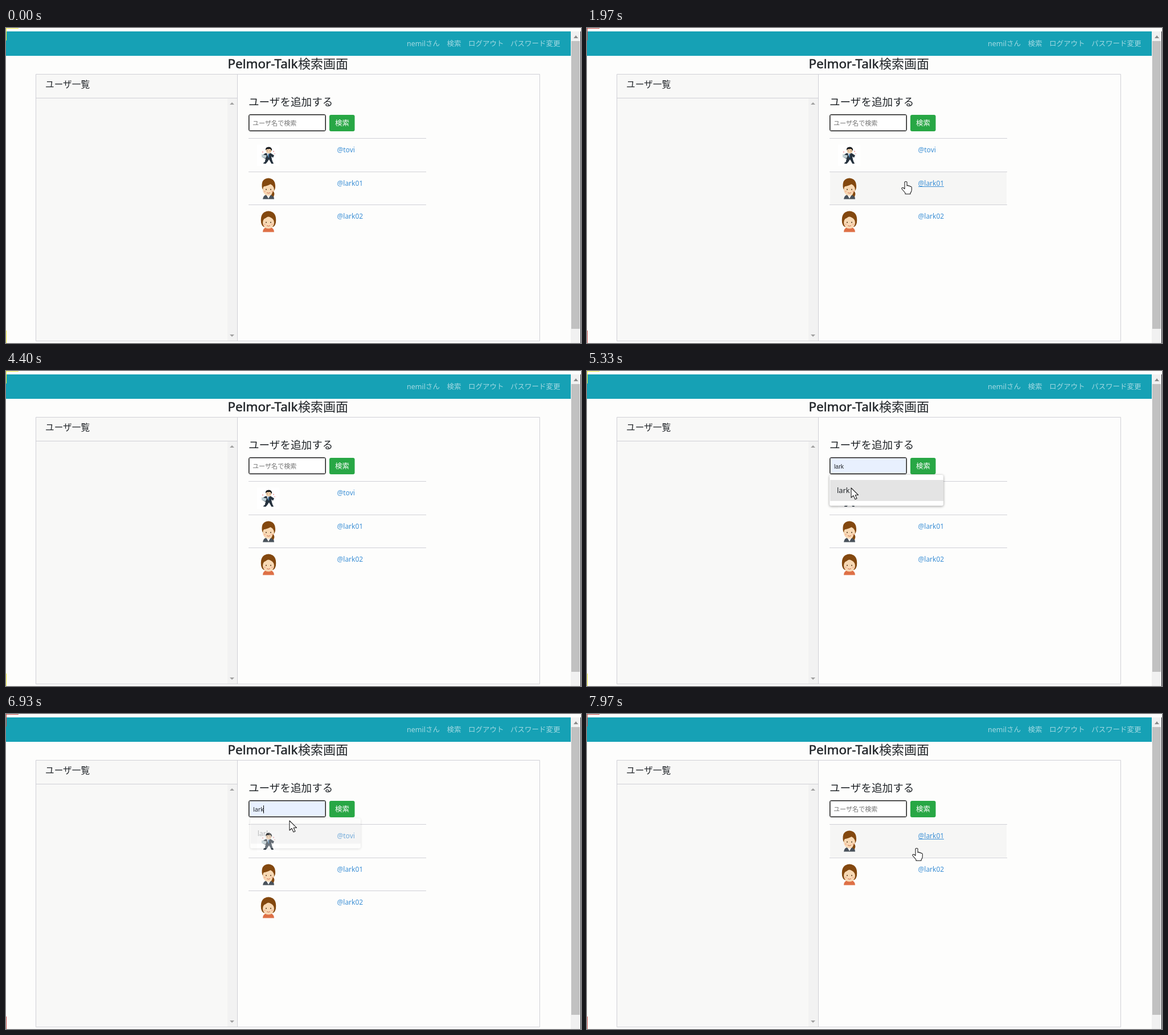
Animation of 1010x555 px, one loop 8 s. Source, as an HTML page:

```html
<!DOCTYPE html>
<html lang="ja">
<head>
<meta charset="utf-8">
<title>ユーザ検索</title>
<style>
html, body { margin: 0; width: 100%; height: 100%; overflow: hidden; background: #fdfdfc; }
svg { display: block; width: 1010px; height: 555px; }
text { font-family: "Noto Sans", "Noto Sans CJK JP", sans-serif; fill: #212529; }
.jp { font-family: "Noto Sans CJK JP", sans-serif; }
.thin { font-weight: 300; }
.title { font-size: 22.4px; stroke: #212529; stroke-width: .5px; }
.nav text { font-size: 12.5px; fill: #a2d9e2; }
.line { stroke: #d0d0d6; fill: none; }
.row .link { font-size: 12px; fill: #3d90d6; }
.row .under { stroke: #3d90d6; visibility: hidden; }
.row .bg { fill: #f6f6f5; visibility: hidden; }
.row.hover .bg, .row.hover .under { visibility: visible; }
</style>
</head>
<body>
<svg viewBox="0 0 1010 555">
  <defs>
    <g id="face">
      <ellipse cx="19" cy="20.500" rx="10" ry="10.500" fill="#f8d9b4"/>
      <g fill="#4a2c17"><circle cx="15" cy="20" r="1"/><circle cx="23" cy="20" r="1"/></g>
      <path d="M16 25.500Q19 28 22 25.500" fill="none" stroke="#c0503a" stroke-width=".8"/>
      <g fill="#f3b79a"><circle cx="12.500" cy="23.500" r="1.500"/><circle cx="25.500" cy="23.500" r="1.500"/></g>
    </g>
    <g id="man">
      <path fill="#fff" d="M-1 0H38V38H-1Z"/>
      <path fill="#26323e" d="M14 15L23 15L25 26L27 32L24 33L20 26L16 32L12 33L14 25L8 22L9 18Z"/>
      <path fill="#26323e" d="M23 15L29 19L27 23L23 20ZM11 31h4v2.500h-5ZM24 31h3l1 2.500h-4Z"/>
      <path fill="#fff" d="M16 15h5l-3 6Z"/>
      <path fill="#3f77a8" d="M18 16h1.500l.5 6-1.500 1Z"/>
      <path fill="#bfd0d5" d="M7 17L16 19L14 24L7 22Z"/>
      <ellipse cx="19.500" cy="10.500" rx="5" ry="4.800" fill="#f3cfa8"/>
      <path fill="#171a1d" d="M14 10Q13 4 20 4Q26 5 25 11L22 7.500L16 8Z"/>
      <path d="M16.500 11h1m4 0h1" stroke="#222"/>
      <g fill="#ec8f96"><circle cx="9" cy="13" r="1"/><circle cx="28" cy="12" r="1"/><circle cx="30" cy="16" r=".8"/></g>
    </g>
    <g id="ponytail">
      <path fill="#83480f" d="M8 18Q5 1 19 0Q32 1 31 17Q30 22 27 24Q30 28 27 32L22 29L10 22Z"/>
      <path fill="#49525b" d="M9 37Q10 30 16 29H23Q29 30 29 37Z"/>
      <path fill="#fff" d="M15 29H23L19 36Z"/>
      <use href="#face"/>
      <path fill="#83480f" d="M8 18Q8 4 19 3Q30 4 30 18Q27 14 25 9Q18 14 9 15Z"/>
      <path fill="#83480f" d="M27 23Q31 26 28 33L24 30Z"/>
    </g>
    <g id="bob">
      <path fill="#83480f" d="M6 20Q4 1 19 0Q34 1 32 20Q31 26 27 28H11Q7 26 6 20Z"/>
      <path fill="#de7046" d="M9 37Q9 30 16 28.500H22Q29 30 29 37Z"/>
      <path fill="#f8d9b4" d="M15 28H23Q19 33 15 28Z"/>
      <use href="#face"/>
      <path fill="#83480f" d="M8 20Q7 4 19 3Q31 4 30 20Q28 14 24 12Q21 11 19 8Q15 13 10 14Z"/>
    </g>
  </defs>

  <path fill="#fdfdfc" d="M0 0H1010V555H0Z"/>
  <path fill="#16a1b5" d="M0 6H992V49H0Z"/>
  <g class="nav">
    <text x="737" y="32" text-anchor="end">nemil</text>
    <text class="jp" x="737" y="32">さん</text>
    <text class="jp" x="774.500" y="32">検索</text>
    <text class="jp" x="812" y="32">ログアウト</text>
    <text class="jp" x="886" y="32">パスワード変更</text>
  </g>
  <path fill="#f1f1f1" d="M992 6H1010V555H992Z"/>
  <path fill="#c1c1c1" d="M993 23H1008V530H993Z"/>
  <path fill="#8b8b8b" d="M997 18l4-5 4 5Z"/>
  <path stroke="#2c2c32" d="M1009.500 6V555"/>

  <text class="title" x="512.500" y="71" text-anchor="end">Pelmor-Talk</text>
  <text class="jp" x="513" y="71" font-size="22">検索画面</text>

  <path fill="#f8f8f7" d="M53 82H406V551H53Z"/>
  <path fill="#f2f2f2" d="M389 124H406V551H389Z"/>
  <path fill="#a0a0a0" d="M393 135l4-4 4 4ZM393 540l4 4 4-4Z"/>
  <path class="line" d="M52.500 81.500H937.500V551.500H52.500ZM406.500 82V551M53 123.500H406"/>
  <text class="jp thin" x="69" y="105" font-size="15.700">ユーザ一覧</text>
  <text class="jp thin" x="426" y="136.500" font-size="18.600">ユーザを追加する</text>

  <rect id="field" x="426.500" y="152.500" width="135" height="29" rx="2.500" stroke="#1c1c1c"/>
  <rect x="427.500" y="153.500" width="133" height="27" rx="1.500" fill="none" stroke="#888"/>
  <text id="hint" class="jp" x="433" y="172" font-size="11.100" style="fill:#757575">ユーザ名で検索</text>
  <text id="typed" x="434" y="172">lark</text>
  <path id="caret" stroke="#111" d="M452.500 161V175"/>
  <rect id="button" x="568" y="153" width="44.500" height="29" rx="3"/>
  <text class="jp" x="578" y="172" font-size="12.500" font-weight="500" style="fill:#fff">検索</text>

  <g id="rows"></g>

  <g id="menu">
    <rect x="426" y="183" width="200" height="54.500" rx="3" fill="#fff" style="filter:drop-shadow(0 1px 2px #0006)"/>
    <path id="option" d="M427 192H626V229H427Z"/>
    <text x="439" y="215" font-size="12.800">lark</text>
  </g>

  <g id="marks" fill="none" stroke-width="2"><path d="M0 0H22M0 0V22M0 533V555"/></g>

  <g id="pointer" fill="#fff" stroke="#222" stroke-width="1.100" stroke-linejoin="round">
    <path id="arrow" d="M0 0V17L4 13.500L7 20L10 18.700L7.200 12.500H12.500Z"/>
    <path id="hand" d="M-2 1.500Q0-.5 2 1.500V8Q4 6.500 5 8.500Q7 7.500 7.700 9.500Q10 8.500 10.300 11V15Q10 19 8 20.500V22.500H-1V20.500L-7 13.500Q-7.500 10.500-4.500 11.500L-2 13.500Z"/>
  </g>
</svg>
<script>
const LOOP = 8000, OPEN = 4460, PICK = 6830, FADE = 150, RESULT = 7500;
const ROW_TOP = 194.4, ROW_STEP = 58.2;
const $ = id => document.getElementById(id);
const show = (el, on) => { el.style.visibility = on ? "visible" : "hidden"; };

// time, x, y of the pointer tip
const path = [
  [0, 500, 170], [1500, 500, 170], [1640, 518, 200], [1970, 560, 270],
  [2300, 568, 330], [2330, 568, 330], [2600, 548, 290], [2870, 518, 237],
  [3130, 500, 200], [3370, 490, 170], [4500, 480, 168], [4800, 468, 204],
  [5330, 464, 206], [5600, 478, 211], [6000, 486, 209], [6200, 486, 209],
  [6750, 482, 205], [6930, 498, 188], [7180, 588, 166], [7420, 588, 166],
  [7870, 579, 236], [LOOP, 579, 236]
];

const users = [["@tovi", "man", 33], ["@lark01", "ponytail", 45], ["@lark02", "bob", 45]];
$("rows").innerHTML = users.map(([name, avatar, width]) => `
  <g class="row">
    <path class="bg" d="M427 0H737V58H427Z"/>
    <path class="line" d="M426 .5H738"/>
    <use href="#${avatar}" x="442" y="11.500"/>
    <text class="link" x="581.5" y="24.500">${name}</text>
    <path class="under" d="M582 26.500h${width}"/>
  </g>`).join("");
const rows = [...document.querySelectorAll(".row")];

function tipAt(t) {
  const i = path.findIndex(p => p[0] > t);
  const [a, b] = [path[i - 1], path[i]];
  const k = (t - a[0]) / (b[0] - a[0]);
  return [1, 2].map(n => a[n] + (b[n] - a[n]) * k);
}

const inside = ([x, y], l, t, r, b) => x >= l && x < r && y >= t && y < b;

function draw(t) {
  const tip = tipAt(t);
  const open = t >= OPEN && t < PICK + FADE;
  const fade = Math.max(0, (t - PICK) / FADE);
  const onOption = open && (t >= PICK || inside(tip, 427, 192, 626, 229));
  const picked = t >= PICK && t < RESULT;
  const filled = onOption || picked;
  const onButton = inside(tip, 568, 153, 613, 183);
  const filtered = t >= RESULT;

  let onRow = false;
  rows.forEach((row, i) => {
    const y = ROW_TOP + ROW_STEP * (filtered ? i - 1 : i);
    const visible = !filtered || i > 0;
    const hover = visible && !open && inside(tip, 427, y, 737, y + ROW_STEP);
    row.style.display = visible ? "" : "none";
    row.setAttribute("transform", `translate(0 ${Math.round(y)})`);
    row.classList.toggle("hover", hover);
    onRow ||= hover;
  });

  show($("hint"), !filled);
  show($("typed"), filled);
  $("typed").style.font = picked ? '10.7px "Noto Sans", sans-serif' : '10.5px "Liberation Sans", sans-serif';
  show($("caret"), picked && t < PICK + 500);
  $("field").setAttribute("fill", filled ? "#e8f0fe" : "#fff");
  $("button").setAttribute("fill", onButton ? "#218838" : "#28a745");

  show($("menu"), open);
  $("menu").style.opacity = 1 - fade;
  const scale = 1 - 0.045 * fade;
  $("menu").setAttribute("transform", `translate(526 210) scale(${scale}) translate(-526 -210)`);
  $("option").setAttribute("fill", onOption ? "#e4e4e4" : "#fff");

  const red = t >= 605 && Math.floor((t - 605) / 506) % 2 === 0;
  $("marks").setAttribute("stroke", red ? "#c8504c" : "#f4f03c");

  const hand = onRow || onButton;
  $("pointer").style.display = inside(tip, 426, 152, 562, 183) ? "none" : "";
  $("pointer").setAttribute("transform", `translate(${tip.map(Math.round)})`);
  show($("hand"), hand);
  show($("arrow"), !hand);
}

const start = performance.now();
function tick() {
  draw((performance.now() - start) % LOOP);
  requestAnimationFrame(tick);
}
tick();
</script>
</body>
</html>
```
